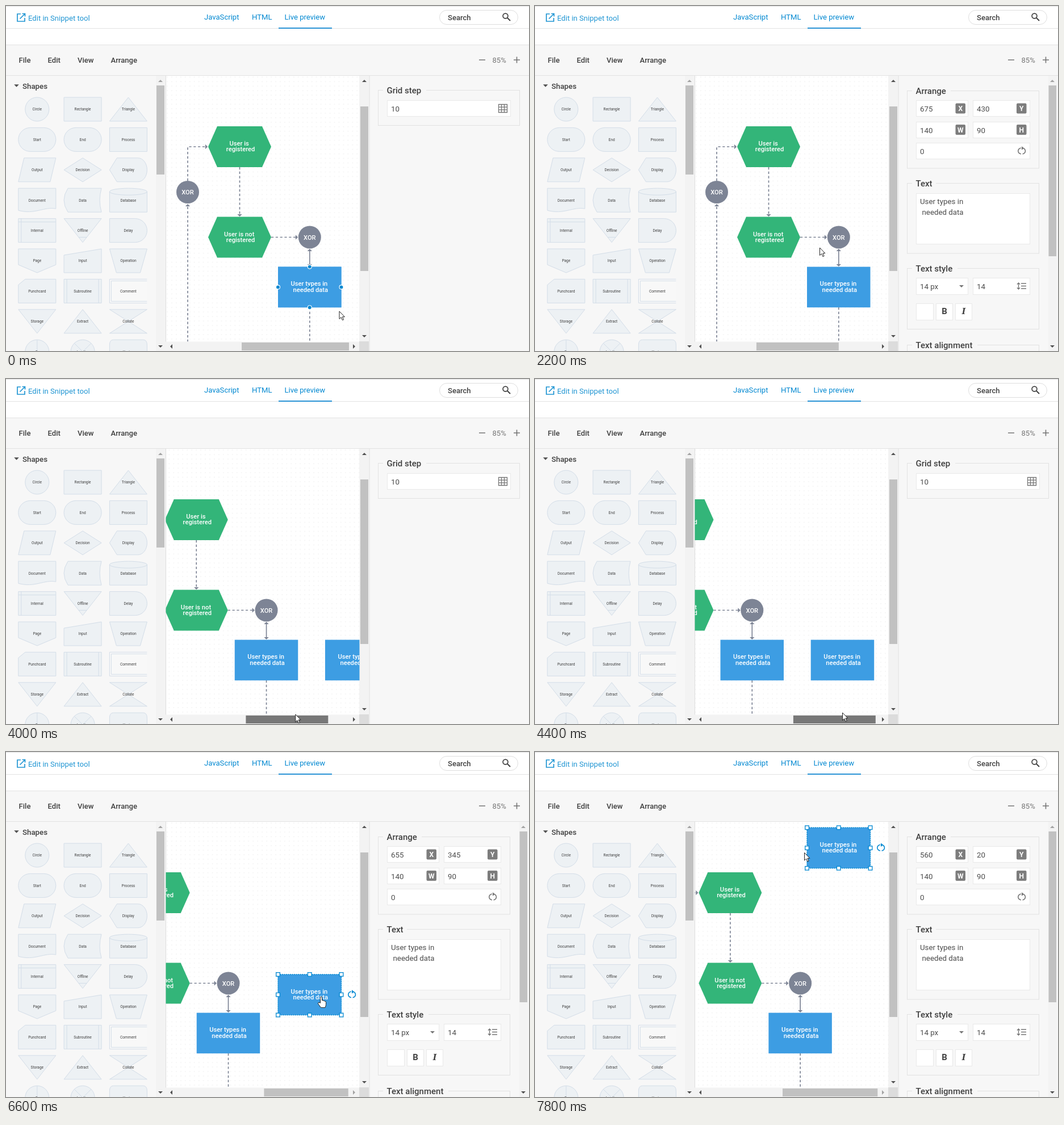
These frames come from a looping animation (921 by 608 pixels, 8 s). An HTML page:

```html
<!DOCTYPE html>
<html lang="en">
<head>
<meta charset="utf-8">
<title>Diagram editor</title>
<style>
html, body { margin: 0; width: 100%; height: 100%; overflow: hidden; background: #f7f7f7; }
svg { display: block; font: 13.1px Roboto, Arial, sans-serif; }
</style>
</head>
<body>
<svg id="stage" width="921" height="608" viewBox="0 0 921 608"></svg>
<script>
const SCALE = 0.796, BLUE = '#0288d1', INK = '#404040', GREY = '#7d8495';

// Markup helpers
const text = (x, y, s, fill = INK, size = 13.1, weight = 400, anchor = 'start') =>
  `<text x="${x}" y="${y}" fill="${fill}" font-size="${size}" font-weight="${weight}" text-anchor="${anchor}">${s}</text>`;
const rect = (x, y, w, h, fill, extra = '') =>
  `<rect x="${x}" y="${y}" width="${w}" height="${h}" fill="${fill}" ${extra}/>`;
const path = (d, fill = 'none', stroke = 'none', extra = '') =>
  `<path d="${d}" fill="${fill}" stroke="${stroke}" ${extra}/>`;
const circle = (x, y, r, fill, extra = '') => `<circle cx="${x}" cy="${y}" r="${r}" fill="${fill}" ${extra}/>`;
const group = (x, y, body, extra = '') => `<g transform="translate(${x} ${y})" ${extra}>${body}</g>`;
const tri = (x, y, angle, size = 4, fill = '#505050') =>
  path(`M${-size} ${size / 2}H${size}L0 ${-size / 2}Z`, fill, 'none', `transform="translate(${x} ${y}) rotate(${angle})"`);

// Page header and menu bar
function header() {
  const line = y => rect(0, y, 921, 1, '#e2e2e2');
  return rect(0, 0, 921, 68, '#fff') + line(0) + line(39) + line(68) + line(122) +
    path('M26 14H20V27H33V21M28.5 13.5H33.5V18.5M33 14L24.5 22.5', 'none', '#2196d3', 'stroke-width="1.7"') +
    text(39, 25.5, 'Edit in Snippet tool', '#2196d3') +
    text(349, 24, 'JavaScript', BLUE) + text(433, 24, 'HTML', BLUE) + text(490.5, 24, 'Live preview', BLUE) +
    rect(480, 38, 94, 2, '#2a93d5') +
    rect(763.5, 7.5, 138, 25, '#fff', 'rx="12.5" stroke="#dedede"') +
    text(778, 25, 'Search', INK, 13.1, 500) +
    circle(879.5, 17.5, 4.4, 'none', 'stroke="#404040" stroke-width="1.7"') +
    path('M882.5 20.5L888 26', 'none', INK, 'stroke-width="2"') +
    [[22.5, 'File'], [73.5, 'Edit'], [126, 'View'], [184.5, 'Arrange']]
      .map(([x, s]) => text(x, 100, s, INK, 13.1, 500)).join('') +
    path('M833 95H844M894 95H905M899.5 89.5V100.5', 'none', '#757575', 'stroke-width="1.6"') +
    text(856.5, 100, '85%', '#757575');
}

// Shape palette: label and outline centred on the origin
const BOX = 'M-33-21H33V21H-33Z', ROUND = 'M0-21A21 21 0 0 1 0 21A21 21 0 0 1 0-21Z';
const PILL = 'M-12-21H12A21 21 0 0 1 12 21H-12A21 21 0 0 1-12-21Z';
const UP = 'M-33 21L0-21 33 21Z', DOWN = 'M-33-21H33L0 21Z';
const SHAPES = [
  ['Circle', ROUND], ['Rectangle', BOX], ['Triangle', UP],
  ['Start', PILL], ['End', PILL], ['Process', BOX],
  ['Output', 'M-23-21H33L23 21H-33Z'], ['Decision', 'M0-21L33 0 0 21-33 0Z'],
  ['Display', 'M-20-21H17A16 21 0 0 1 17 21H-20L-33 0Z'],
  ['Document', 'M-33-21H33V15C12 11-4 26-33 18Z'], ['Data', 'M-26-21H33Q27 0 33 21H-26Q-40 0-26-21Z'],
  ['Database', 'M-33-15V21H33V-15A33 6 0 0 0-33-15A33 6 0 0 0 33-15'],
  ['Internal', BOX + 'M-28-21V21M-33-15H33'], ['Offline', DOWN + 'M-7 12H7'],
  ['Delay', 'M-33-21H12A21 21 0 0 1 12 21H-33Z'],
  ['Page', 'M-33-21H33V7L0 21-33 7Z'], ['Input', 'M-33-10L33-21V21H-33Z'], ['Operation', 'M-33-21H33L21 21H-21Z'],
  ['Punchcard', 'M-21-21H33V21H-33V-11Z'], ['Subroutine', BOX + 'M-28-21V21M28-21V21'],
  ['Comment', 'M33-21H-33V21H33M33-18H-30V18H33'],
  ['Storage', DOWN], ['Extract', UP], ['Collate', 'M-33-21H33L-33 21H33Z'],
  ['Or', ROUND + 'M-21 0H21M0-21V21'], ['Junction', ROUND + 'M-15-15L15 15M15-15L-15 15'],
  ['Keying', 'M-26-21H26Q33-21 33-12V21H-33V-12Q-33-21-26-21Z']
];
function palette() {
  return tri(18.5, 140.5, 180, 4.3) + text(29, 146, 'Shapes', INK, 13.3, 500) +
    SHAPES.map(([name, d], i) => group(54.8 + i % 3 * 80.3, 182 + Math.floor(i / 3) * 53.4,
      path(d, name == 'Comment' ? '#f8f8f8' : '#edf1f4', '#d3dde8') +
      text(0, 2.3, name, '#404040', 6.55, 400, 'middle'))).join('') +
    rect(264, 123, 17, 485, '#f3f3f3') + rect(265, 140, 14, 157, '#c1c1c1') +
    tri(272, 132, 0, 4, '#a3a3a3') + tri(272, 600, 180) + rect(281, 123, 1, 485, '#dedede');
}

// Diagram, laid out for the unscrolled view
const label = (x, y, a, b) =>
  text(x - 0.8, y - 2, a, '#fff', 11.15, 500, 'middle') + text(x + 1.6, y + 8.3, b, '#fff', 11.15, 500, 'middle');
const hexagon = (y, a, b) =>
  path(`M356 ${y}l16-36h79l16 36-16 36h-79Z`, '#33b579') + label(411.5, y, a, b);
const xor = (x, y) => circle(x, y, 20, GREY) + text(x, y + 4, 'XOR', '#fff', 11.15, 500, 'middle');
const taskBox = (x, y) => rect(x, y, 111.5, 71.6, '#3d9de3') + label(x + 55.7, y + 35.7, 'User types in', 'needed data');
const DIAGRAM =
  path('M320 308V248H352M320 592V352M411.5 284V368M467 407.5H511M534.8 531V592', 'none', GREY,
    'stroke-width="1.7" stroke-dasharray="4.2 3.6"') +
  path('M534.8 430V456', 'none', GREY, 'stroke-width="1.7"') +
  [[353, 248, 90], [320, 351, 0], [411.5, 369, 180], [512, 407.5, 90], [534.8, 430, 0], [534.8, 457, 180]]
    .map(([x, y, a]) => tri(x, y, a, 4.2, GREY)).join('') +
  xor(320, 328) + xor(534.8, 407.5) +
  hexagon(248, 'User is', 'registered') + hexagon(407.5, 'User is not', 'registered') + taskBox(479, 459.6);

const rotateIcon = (x, y, color) => group(x, y,
  path('M-1-5.2A5.2 5.2 0 0 0-1 5.2M1.5 5.2A5.2 5.2 0 0 0 1-5.2', 'none', color, 'stroke-width="1.6"') +
  path('M0-8.2L4-5 0-1.8Z', color));

function marks(x, y, selected, hovered) {
  const w = 111.5, h = 71.6;
  if (selected) {
    const spots = [0, 0.5, 1].flatMap(u => [0, 0.5, 1].map(v => [u, v])).filter(([u, v]) => u != 0.5 || v != 0.5);
    return rect(x, y, w, h, 'none', `stroke="${BLUE}" stroke-width="1.5" stroke-dasharray="2 1.5"`) +
      spots.map(([u, v]) => rect(x + u * w - 3.3, y + v * h - 3.3, 6.6, 6.6, '#fff', `stroke="${BLUE}" stroke-width="1.3"`)).join('') +
      rotateIcon(x + 130, y + 35.5, BLUE);
  }
  if (!hovered) return '';
  return [[0.5, 0], [0.5, 1], [0, 0.5], [1, 0.5]]
    .map(([u, v]) => circle(x + u * w, y + v * h, 3.5, BLUE, 'stroke="#fff" stroke-width="1.1"')).join('') +
    path(`M${x + 53} ${y + 33}l5 5m0-5l-5 5`, 'none', BLUE, 'stroke-width="1.2"');
}

// Settings panels
const fieldset = (y, h, w, name, gap) =>
  rect(655.5, y, w, h, 'none', 'stroke="#e2e2e2"') + rect(664, y - 1, gap, 2, '#f7f7f7') +
  text(670.5, y + 5, name, INK, 15, 500);
const field = (x, y, w, h, value = '') =>
  rect(x + 0.5, y + 0.5, w, h, '#fff', 'stroke="#e9e9e9"') + text(x + 7, y + 20, value, '#4c4c4c', 13.3);
const badge = (x, y, s) => rect(x, y, 17.5, 18, '#7d7d7d', 'rx="2"') + text(x + 8.8, y + 13.5, s, '#fff', 12, 700, 'middle');

const GRID_PANEL = fieldset(148.5, 62, 249, 'Grid step', 76) + field(671, 166, 217, 28, '10') +
  path('M867.5 173.5H882.5V187.5H867.5ZM872.5 173V188M877.5 173V188M867 178.2H883M867 182.8H883', 'none', '#757575', 'stroke-width="1.3"');

const arrangePanel = (x, y) =>
  fieldset(149.5, 136.5, 232, 'Arrange', 68) +
  field(671, 166, 91, 28, x) + badge(740.5, 171.5, 'X') + field(771, 166, 100, 28, y) + badge(848, 171.5, 'Y') +
  field(671, 204, 91, 28, '140') + badge(740.5, 209, 'W') + field(771, 204, 100, 28, '90') + badge(848, 209, 'H') +
  field(671, 241, 200, 28, '0') + rotateIcon(857, 255.5, '#757575') +
  fieldset(312.5, 123.5, 232, 'Text', 42) + field(671, 330, 200, 89) +
  text(678, 349, 'User types in', '#4c4c4c', 13.3) + text(681.5, 368, 'needed data', '#4c4c4c', 13.3) +
  fieldset(462.5, 107, 232, 'Text style', 80) +
  field(671, 479, 91, 29, '14 px') + tri(751, 494, 180, 4, '#757575') + field(771, 479, 100, 29, '14') +
  path('M856 489H865M856 493.5H865M856 498H865M851.5 489V498M849 490.5L851.5 488 854 490.5M849 496.5L851.5 499 854 496.5',
    'none', '#757575', 'stroke-width="1.4"') +
  field(671, 524, 30, 29) + field(706, 524, 29, 29) + field(740, 524, 29, 29) +
  text(721, 543, 'B', INK, 15, 700, 'middle') +
  `<g font-style="italic" font-family="DejaVu Serif, Noto Serif, serif">${text(755, 543, 'I', INK, 14, 700, 'middle')}</g>` +
  fieldset(597.5, 80, 232, 'Text alignment', 115) +
  rect(904, 123, 15, 485, '#f3f3f3') + rect(904.5, 140, 13.5, 301, '#c1c1c1') +
  tri(911, 132, 0, 4, '#a3a3a3') + tri(911, 600, 180);

// Motion tracks: time, then values
const POINTER = [
  [0, 587, 538], [200, 578, 527], [600, 550, 502], [1200, 550, 500], [1800, 709, 500], [2000, 709, 500],
  [2200, 501.5, 426], [3200, 478, 594], [3600, 478, 594], [4400, 541.5, 588], [4600, 541.5, 588],
  [5600, 569, 502], [6400, 569, 502], [7000, 527, 290], [7400, 484, 180], [7600, 475, 163], [7800, 474.5, 177.5]];
const BOX_POS = [
  [0, 475, 430], [1200, 475, 430], [1800, 675, 430], [6400, 675, 430], [7000, 620, 180], [7400, 570, 40], [7600, 560, 20]];
const SCROLL = [[0, 0], [3600, 0], [4400, 152.5], [4600, 154]];

function at(track, t) {
  const i = track.findIndex(k => k[0] > t);
  if (i < 0) return track[track.length - 1].slice(1);
  const a = track[i - 1], b = track[i], u = (t - a[0]) / (b[0] - a[0]);
  return a.slice(1).map((v, j) => v + (b[j + 1] - v) * u);
}
const between = (t, a, b) => t >= a && t < b;

function pointer(t) {
  const [x, y] = at(POINTER, t);
  const hand = between(t, 400, 1800) || between(t, 5200, 7600);
  return group(x, y, path(hand
    ? 'M-1.5 11V1.5Q-1.5 0 0 0T1.5 1.5V6.5Q3 5.5 4.2 7Q5.6 6.4 6.4 8Q8.5 7.6 8.5 10V13Q8.5 16 7 19H-.5L-5.3 12.5Q-5.8 10-4 10Z'
    : 'M0 0V13.5L3.2 10.6 5.4 15.6 7.6 14.7 5.4 9.8H9.4Z', '#fff', '#222'));
}

function dynamic(t) {
  const [x, y] = at(BOX_POS, t).map(v => Math.round(v / 5) * 5);
  const extra = (x - 475) * SCALE;
  const scroll = t >= 6400 ? extra : at(SCROLL, t)[0];
  const selected = between(t, 600, 3400) || t >= 6400;
  const hovered = t < 600 || between(t, 5200, 6400);
  const bx = 479 + extra, by = 459.6 + (y - 430) * SCALE;
  // The thumb follows the content width, which grows with the box
  const content = 524 + extra;
  const thumb = between(t, 3400, 4800) ? '#787878' : t == 3200 ? '#a8a8a8' : '#c1c1c1';
  return `<g clip-path="url(#view)">` +
    group(-scroll, 0, rect(270, 123, 800, 470, 'url(#dots)') + DIAGRAM + taskBox(bx, by) + marks(bx, by, selected, hovered)) + '</g>' +
    rect(281, 591.5, 341, 17, '#f3f3f3') + rect(307.3 + 291 * (194 + scroll) / content, 593, 99000 / content, 14, thumb) +
    tri(291, 600, -90) + tri(613, 600, 90, 4, t >= 6400 ? '#a3a3a3' : '#505050') +
    (selected ? arrangePanel(x, y) : GRID_PANEL) + pointer(t);
}

const stage = document.getElementById('stage');
stage.innerHTML = `<defs><clipPath id="view"><rect x="281.5" y="123" width="341" height="468.5"/></clipPath>
  <pattern id="dots" x="96.9" y="113.3" width="${10 * SCALE}" height="${10 * SCALE}" patternUnits="userSpaceOnUse">
  <rect x="3.5" y="3.5" width="1" height="1" fill="#dcdcdc"/></pattern></defs>` +
  header() + rect(281, 123, 341, 469, '#fff') + palette() +
  rect(622, 123, 17, 485, '#f3f3f3') + rect(624, 177, 14, 290, '#c1c1c1') +
  tri(631, 132, 0) + tri(631, 582, 180) + rect(622, 591, 17, 17, '#dcdcdc') + rect(639.5, 123, 1, 485, '#e0e0e0') +
  '<g id="live"></g>';
const live = document.getElementById('live');

let shown = -1;
function frame(now) {
  const t = Math.floor(now % 8000 / 200) * 200;
  if (t != shown) live.innerHTML = dynamic(shown = t);
  requestAnimationFrame(frame);
}
frame(performance.now());
</script>
</body>
</html>
```
